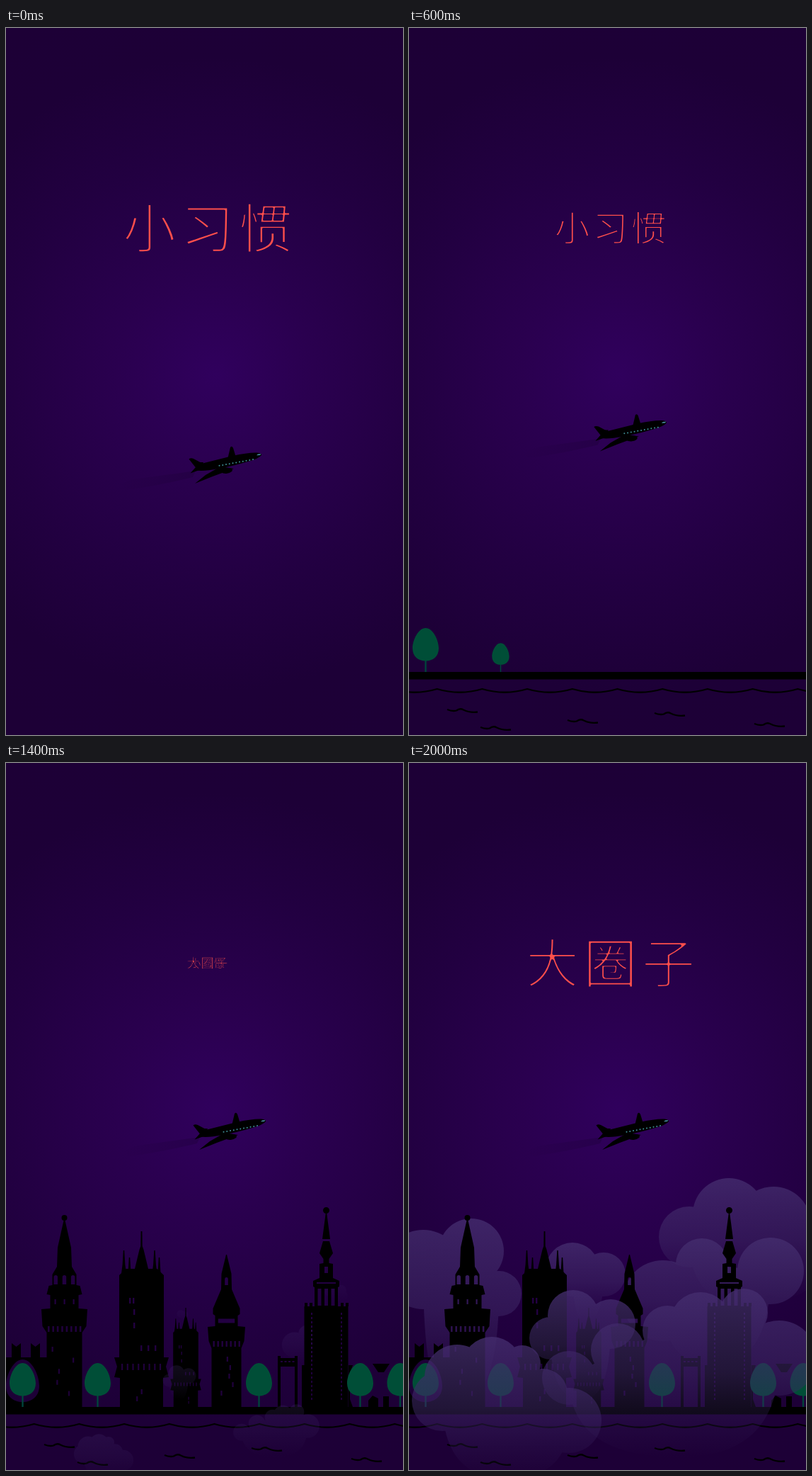
These frames come from a looping animation (561 by 998 pixels, 2360 ms). An HTML page:

```html
<!DOCTYPE html>
<html lang="zh-CN">
<head>
<meta charset="utf-8">
<title>小习惯 大圈子</title>
<style>
  html, body { margin: 0; width: 100%; height: 100%; overflow: hidden; background: #1d0036; }
  svg { display: block; width: 100%; height: 100%; }
  text {
    font-family: "Noto Sans CJK SC", "Noto Sans CJK", sans-serif;
    font-weight: 100;
    text-anchor: middle;
    text-rendering: geometricPrecision;
    fill: #ff4f4b;
    stroke: url(#sky);
    stroke-linejoin: round;
  }
</style>
</head>
<body>
<svg viewBox="0 0 561 998" preserveAspectRatio="none">
  <defs>
    <radialGradient id="sky" gradientUnits="userSpaceOnUse" cx="296" cy="490" r="560">
      <stop offset="0" stop-color="#30005d"/>
      <stop offset=".25" stop-color="#2a004f"/>
      <stop offset=".55" stop-color="#220041"/>
      <stop offset=".8" stop-color="#1d0037"/>
      <stop offset="1" stop-color="#1d0036"/>
    </radialGradient>
    <linearGradient id="mist" x1="0" y1="0" x2="0" y2="1">
      <stop offset="0" stop-color="#452e6f" stop-opacity=".78"/>
      <stop offset=".5" stop-color="#3d2765" stop-opacity=".55"/>
      <stop offset="1" stop-color="#34205a" stop-opacity="0"/>
    </linearGradient>
    <linearGradient id="smoke">
      <stop offset="0" stop-color="#1a0033" stop-opacity="0"/>
      <stop offset="1" stop-color="#1a0033" stop-opacity=".35"/>
    </linearGradient>
  </defs>
  <rect width="561" height="998" fill="url(#sky)"/>
  <g id="back"></g>
  <g id="city"></g>
  <g id="water"></g>
  <g id="front"></g>
  <g id="plane"></g>
  <g id="words"></g>
</svg>
<script>
const LOOP = 2360, STEP = 40, LAST = 2000, GROUND = 909;
const [back, city, water, front, plane, words] =
  ["back", "city", "water", "front", "plane", "words"].map(id => document.getElementById(id));

function add(parent, tag, attrs = {}) {
  const node = document.createElementNS("http://www.w3.org/2000/svg", tag);
  for (const key in attrs) node.setAttribute(key, attrs[key]);
  parent.appendChild(node);
  return node;
}
const path = (parent, d, attrs) =>
  add(parent, "path", { d, "fill-rule": "evenodd", ...attrs });

let seed = 7;
function random() {
  seed = (seed * 16807) % 2147483647;
  return seed / 2147483647;
}

// Path builders
const times = (n, make) => Array.from({ length: n }, (_, i) => make(i)).join("");
const box = (x, y, w, h) => `M${x},${y}h${w}v${h}h${-w}z`;
const row = (x, y, gap, n, w, h) => times(n, i => box(x + i * gap, y, w, h));
const column = (x, y, gap, n, w, h) => times(n, i => box(x, y + i * gap, w, h));
const disc = (x, y, r) =>
  `M${x - r},${y}a${r},${r} 0 1 1 ${2 * r},0a${r},${r} 0 1 1 ${-2 * r},0z`;
const arch = (x, y, w, h) =>
  `M${x},${y + h}v${w / 2 - h}a${w / 2},${w / 2} 0 0 1 ${w},0v${h - w / 2}z`;
const pinnacle = (x, y) => `M${x - .7},${y}h1.4l1.2,20l2,16h-7.8l2,-16z`;
const scatter = (x, y, w, h, n) =>
  times(n, i => box(x + random() * w, y + i * h / n, 2.3, 7));

function mirror(cx, side) {
  const right = side.map(([dx, y]) => `${cx + dx},${y}`);
  const left = side.map(([dx, y]) => `${cx - dx},${y}`).reverse();
  return `M${right.concat(left).join("L")}z`;
}
function egg(x, top, bottom, w) {
  const h = bottom - top, wide = top + h * .62;
  const half = s => `C${x + s * w},${bottom - h * .13} ${x + s * w * .55},${bottom} ${x},${bottom}`;
  return `M${x},${top}C${x + w * .55},${top} ${x + w},${top + h * .36} ${x + w},${wide}${half(1)}` +
    `M${x},${top}C${x - w * .55},${top} ${x - w},${top + h * .36} ${x - w},${wide}${half(-1)}`;
}

// Groups that scale up from a fixed point
const growers = [];
function grower(parent, x, y, start, length = 160, fade = false) {
  const node = add(parent, "g");
  growers.push({ node, x, y, start, end: start + length, fade });
  return node;
}

function domeTower(x, start) {
  const g = grower(city, x, GROUND, start);
  const turret = "V819l6.5,5l6.5,-5V839";
  path(g, `M0,839H8${turret}H35${turret}H58V909H0z` + egg(23.5, 842, 902, 23.5));
  path(g, disc(x, 642, 4));
  path(g, mirror(x, [[.8, 645], [9.5, 684], [10.5, 711], [17, 722], [17, 737], [22, 738],
    [25, 750], [20, 751], [20, 770], [32.5, 771], [31, 795], [25, 804], [25, 909]]) +
    times(3, i => arch(x - 15 + i * 12.2, 723, 5.5, 13)) +
    row(x - 23.5, 795, 6.4, 8, 2.6, 8) + row(x - 14, 757, 13, 3, 2.2, 7) +
    scatter(x - 18, 824, 32, 78, 5));
}

function squareTower(x, scale, start) {
  const g = add(grower(city, x, GROUND, start), "g", {
    transform: `translate(${x} ${GROUND}) scale(${scale}) translate(0 -${GROUND})`
  });
  path(g, mirror(0, [[.9, 661], [1.2, 682], [3, 687], [9.5, 714], [22, 714], [31.5, 723],
    [31.5, 839], [38.5, 839], [34.5, 852], [38.5, 867], [30.5, 868], [30.5, 909]]) +
    row(-28.5, 848, 7.7, 8, 2.2, 9) + row(-17.5, 755, 5, 2, 2.4, 8) +
    column(-11.5, 771, 19, 2, 2.4, 8) + row(-1.5, 822, 10, 3, 2.4, 8) +
    scatter(-18, 884, 32, 20, 2));
  for (const side of [0, 1])
    path(g, pinnacle(side ? 18.5 : -25, 688) + pinnacle(side ? 25 : -17, 698),
      { "fill-rule": "nonzero" });
}

function coneTower(x, start) {
  const g = grower(city, x, GROUND, start);
  path(g, mirror(x, [[.5, 694], [7, 721], [7.5, 743], [19, 770], [19, 778], [16, 780], [16, 795],
    [26.5, 796], [25, 816], [21, 826], [21, 909]]) +
    arch(x - 2.3, 726, 4.6, 11) + box(x - 11.7, 784.5, 23.4, 6) +
    row(x - 19, 816, 6, 7, 2.4, 8) + scatter(x - 15, 838, 28, 60, 5));
}

function starTower(x, start) {
  const g = grower(city, x + 14.5, GROUND, start);
  path(g, disc(x, 631.5, 4.5) + mirror(x, [[.8, 636], [5.5, 672]]));
  path(g, mirror(x, [[4.5, 675], [9.5, 692], [4, 700], [4, 706], [9.5, 707], [9.5, 727],
    [18.5, 731], [18.5, 739], [16.5, 740], [16.5, 767]]) +
    box(x - 2.5, 711, 5, 9) + box(x - 13.5, 733, 27, 2) + row(x - 12, 742, 9.5, 3, 5, 24));
  path(g, mirror(x, [[31, 767], [31, GROUND]]) +
    column(x - 21.5, 776, 6, 21, 2, 3) + column(x + 20.5, 776, 6, 21, 2, 3));
  path(g, row(x - 30.5, 762, 7, 2, 4, 5) + row(x + 20.5, 762, 7, 2, 4, 5));
  // gate on the left, low walls on the right
  path(g, box(384, 840, 28, 12) + row(388, 844, 5.5, 4, 3, 2) + row(384, 837, 24, 2, 4, 3) +
    row(384, 852, 24, 2, 4, 57) + box(418, 850, 4, 59));
  path(g, "M518,848H542L534,860H526zM512,909V900L518,893L526,897V909zM533,909V894H541V909z" +
    "M484,850h6l-4,12v36l4,11h-6z");
}

function tree(x, start) {
  const g = grower(city, x, GROUND, start, 170);
  path(g, box(x - 1.2, 890, 2.4, 19), { fill: "#00443b" });
  path(g, egg(x, 847, 893.5, 18.5), { fill: "#004e37", "fill-rule": "nonzero" });
}

// Lobes run left to right; a bowl under their centres fills the body
function cloud(parent, start, base, ...lobes) {
  const left = Math.min(...lobes.map(([x, , r]) => x - r));
  const right = Math.max(...lobes.map(([x, , r]) => x + r));
  const mid = (left + right) / 2;
  const first = lobes[0], last = lobes[lobes.length - 1];
  const bowl = "M" + lobes.map(([x, y]) => `${x},${y}`).join("L") +
    `Q${last[0]},${base} ${mid},${base}Q${first[0]},${base} ${first[0]},${first[1]}z`;
  const g = grower(parent, mid, base, start, 700, true);
  path(g, bowl + lobes.map(lobe => disc(...lobe)).join(""),
    { fill: "url(#mist)", "fill-rule": "nonzero" });
}

function buildWater() {
  path(water, box(0, GROUND, 561, 10.5));
  const ripples = [[54, 962], [101, 987], [224, 977], [347, 967], [488, 982]]
    .map(p => `M${p}q7,3 13,1.5q5,-4 10,-1q9,4.5 20,3`).join("");
  path(water, "M-24,933" + "q32,9.5 63.7,0".repeat(10) + ripples,
    { fill: "none", stroke: "#000", "stroke-width": 2.3, "stroke-linejoin": "round" });
}

function buildPlane() {
  path(plane, "M268,625L180,637Q140,650 170,652Q215,646 264,634z", { fill: "url(#smoke)" });
  path(plane, "M276,615Q300,609 320,604Q342,599 355,599.5Q362,600.5 361,603Q357,608 342,612" +
    "Q318,619 300,622Q280,626 269,624.5z");
  // tail, then wings and engine
  path(plane, "M258.5,608.5Q261,606.5 265,608L280,616L270,623z");
  path(plane, "M268,619L274,613L279,613L277,617zM260.5,628.5L268,620L276,623z");
  path(plane, "M313,609L317,592Q319,589 321,593L325,606z");
  path(plane, "M303,619L282,631L267,643L292,633L322,622z");
  add(plane, "ellipse", { cx: 312, cy: 625, rx: 8, ry: 3.8, transform: "rotate(-8 312 625)" });
  for (let i = 0; i < 11; i++)
    add(plane, "circle", { cx: 301.5 + i * 4.75, cy: 617.8 - i * .87, r: 1, fill: "#3f8f96" });
  path(plane, "M354,603.2L356,601.4L360.5,601.2L359,603z", { fill: "#4a8fa5" });
}

// Mean stroke width of a glyph in em: twice its area over its perimeter
function stem(char) {
  const size = 200, box = 260;
  const ctx = new OffscreenCanvas(box, box).getContext("2d");
  ctx.font = `100 ${size}px "Noto Sans CJK SC", "Noto Sans CJK", sans-serif`;
  ctx.fillText(char, 30, 205);
  const data = ctx.getImageData(0, 0, box, box).data;
  const ink = (x, y) => data[(y * box + x) * 4 + 3] > 127 ? 1 : 0;
  let area = 0, edge = 0;
  for (let y = 1; y < box - 1; y++)
    for (let x = 1; x < box - 1; x++) {
      const here = ink(x, y);
      const differs = (dx, dy) => here ^ ink(x + dx, y + dy);
      area += here;
      edge += differs(1, 0) + differs(0, 1) + (differs(1, 1) + differs(-1, 1)) * Math.SQRT1_2;
    }
  return 2 * area / (edge * .414) / size;
}

// A sky-coloured outline slims each glyph to a hairline
function makeWord(chars) {
  const glyphs = [...chars].map(char => {
    const node = add(words, "text");
    node.textContent = char;
    return { node, slim: Math.max(0, stem(char) - .021) };
  });
  return k => glyphs.forEach(({ node, slim }, i) => {
    const size = 76 * k;
    node.style.display = k > .01 ? "" : "none";
    node.style.fontSize = size + "px";
    node.style.strokeWidth = slim * size;
    node.setAttribute("x", 284.5 + (i - 1) * 82 * k);
    node.setAttribute("y", 282 + .38 * size);
  });
}

cloud(back, 1300, 760, [396, 669, 43], [452, 637, 51], [515, 651, 53], [530, 705, 50]);
cloud(back, 1180, 850, [359, 759, 57], [414, 708, 37], [511, 717, 47]);
cloud(back, 1300, 906, [20, 715, 56], [88, 689, 46], [127, 749, 32]);
cloud(back, 1300, 788, [231, 715, 38], [275, 722, 31]);

domeTower(82.5, 600);
squareTower(191.5, 1, 700);
squareTower(254, .565, 980);
coneTower(311.5, 900);
starTower(452.5, 1120);
tree(23.5, 370);
tree(129.5, 488);
tree(357.5, 600);
tree(500.5, 710);
tree(557, 880);
buildWater();

cloud(front, 1180, 899, [200, 812, 30], [232, 780, 36], [285, 792, 35]);
cloud(front, 1180, 980, [226, 868, 38], [295, 829, 38], [365, 801, 35], [412, 790, 43],
  [473, 776, 34], [523, 840, 53]);
cloud(front, 1180, 1010, [47, 900, 43], [68, 867, 46], [117, 852, 42], [160, 848, 26],
  [189, 890, 35], [226, 928, 46]);
buildPlane();
const habit = makeWord("小习惯"), circle = makeWord("大圈子");

const ratio = (t, a, b) => Math.min(1, Math.max(0, (t - a) / (b - a)));

function draw(t) {
  for (const { node, x, y, start, end, fade } of growers) {
    const k = ratio(t, start, end);
    node.style.display = k ? "" : "none";
    node.setAttribute("transform", `translate(${x} ${y}) scale(${k}) translate(${-x} ${-y})`);
    if (fade) node.setAttribute("opacity", k);
  }
  water.setAttribute("opacity", ratio(t, 0, 400));
  const climb = ratio(t, 0, 1280);
  plane.setAttribute("transform", `translate(${6 * climb} ${-97 * climb})`);
  habit(1 - ratio(t, 0, 1760));
  circle(ratio(t, 1120, LAST) ** 1.25);
}

const began = performance.now();
function tick() {
  const t = (performance.now() - began) % LOOP;
  draw(Math.min(LAST, Math.floor(t / STEP) * STEP));
  requestAnimationFrame(tick);
}
tick();
</script>
</body>
</html>
```
